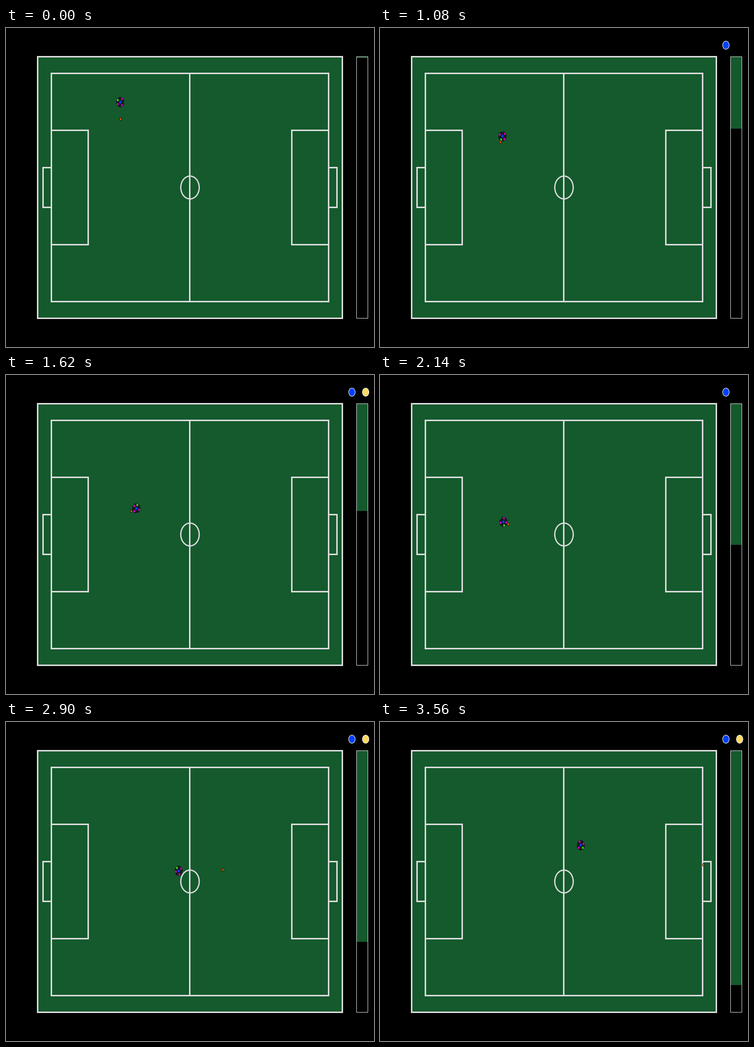
A matplotlib script that plays this animation: 750x650 px, repeating every 3.61 s.

```python
import numpy as np
import matplotlib.pyplot as plt
from matplotlib.animation import FuncAnimation
from matplotlib.patches import Ellipse, Polygon, Rectangle

W, H, DPI = 750, 650, 100
PX = 72 / DPI                       # one pixel in points
SCALE = np.array([94.2, -116.25])   # pixels per metre
TICK, STEP, LOOP = 10, 20, 3610
LAST_STEP = 178

GRASS, LINE = "#145a2d", "#dcdcdc"
BLUE, YELLOW = "#0040ff", "#fada5e"
GREEN, PURPLE, ORANGE = "#39dc14", "#cc00cc", "#fd6a02"
BODY = "#191919"

# Robot key poses: time, x, y
ROBOT = np.array([(0, 233, 151), (540, 232, 174), (1080, 249.5, 220.5),
                  (1620, 265.5, 272), (2150, 252, 299.5), (2600, 308, 304),
                  (3200, 389.5, 291.5), (3560, 409, 251)])
# time and angle in degrees: where the robot faces, where it touches the ball
HEADING = np.array([(0, 0), (540, -137.5), (1080, -263), (1620, -437),
                    (2600, -712.5), (3200, -768), (3560, -912)])
BEARING = np.array([(520, -84), (1080, -114), (1620, -155),
                    (2050, -25), (2580, -8)])
TOUCH, KICK, FINISH = 520, 2580, 2720
BALL_REST = 233.5, 185.5


def robot_at(t):
    """Cubic Hermite curve through the key poses."""
    times, pts = ROBOT[:, 0], ROBOT[:, 1:]
    slopes = np.gradient(pts, times, axis=0)
    i = min(np.searchsorted(times, t, "right") - 1, len(times) - 2)
    h = times[i + 1] - times[i]
    u = (t - times[i]) / h
    return ((1 + 2 * u) * (1 - u) ** 2 * pts[i]
            + u * (1 - u) ** 2 * h * slopes[i]
            + u * u * (3 - 2 * u) * pts[i + 1]
            + u * u * (u - 1) * h * slopes[i + 1])


def angle_at(keys, t):
    return np.radians(np.interp(t, keys[:, 0], keys[:, 1]))


def around(center, radius, angles):
    """Pixel points at polar offsets in metres from a center."""
    offsets = np.column_stack([np.cos(angles), np.sin(angles)])
    return center + radius * offsets * SCALE


def ball_at(t):
    """At rest, then pushed along by the robot, then shot at the goal."""
    if t < TOUCH:
        return BALL_REST
    if t < KICK:
        return around(robot_at(t), 0.115, [angle_at(BEARING, t)])[0]
    s = t - KICK
    return (317.3 + 0.4103 * s - 6.28e-5 * s * s,
            306.3 - 0.0165 * s + 1e-6 * s * s)


fig = plt.figure(figsize=(W / DPI, H / DPI), dpi=DPI, facecolor="black")
ax = fig.add_axes([0, 0, 1, 1])
ax.set_xlim(0, W)
ax.set_ylim(H, 0)
ax.axis("off")


def box(x0, y0, x1, y1, fill="none", edge=LINE, width=3):
    return ax.add_patch(Rectangle((x0, y0), x1 - x0, y1 - y0, fc=fill, ec=edge,
                                  lw=width * PX, joinstyle="miter", snap=False))


def dot(x, y, rx, ry, fill, edge="none", width=0, z=4):
    return ax.add_patch(Ellipse((x, y), 2 * rx, 2 * ry, fc=fill, ec=edge,
                                lw=width * PX, zorder=z))


# field
box(64.5, 58.5, 685.5, 591.5, fill=GRASS)
box(92.5, 92.5, 657.5, 557.5)
ax.plot([374.5, 374.5], [92.5, 557.5], color=LINE, lw=3 * PX, snap=False,
        solid_capstyle="butt", zorder=1)
for left, right, half in [(92.5, 167.5, 116.5), (75.5, 92.5, 40.5)]:
    box(left, 325 - half, right, 325 + half)
    box(W - right, 325 - half, W - left, 325 + half)
dot(375, 325, 18.8, 23.25, "none", LINE, 2.6, z=1)

# time bar and lamps
BAR_TOP, BAR_BOTTOM = 58.5, 591.5
bar = box(715, BAR_TOP, 737, BAR_TOP, fill=GRASS, edge="none", width=0)
box(714.5, BAR_TOP, 737.5, BAR_BOTTOM, width=1)
blue_lamp = dot(705, 35, 6.6, 8.3, BLUE, "white", 1)
yellow_lamp = dot(733, 35, 6.6, 8.3, YELLOW, "white", 1)

# robot: a disc with a flat front, and its tags
half_front = np.arccos(0.078 / 0.09)
RIM = np.linspace(half_front, 2 * np.pi - half_front, 40)
TAG_ANGLES = np.radians([57.4, -57.4, -147.4, 147.4])
body = ax.add_patch(Polygon(around((0, 0), 0.09, RIM), fc=BODY, zorder=3))
center_tag = dot(0, 0, 2.3, 2.9, BLUE)
tags = [dot(0, 0, 1.9, 2.4, color) for color in [PURPLE] * 3 + [GREEN]]
ball = dot(0, 0, 1.9, 2.6, ORANGE, "black", 0.8, z=5)


def draw(i):
    step = min(i * TICK // STEP, LAST_STEP)
    t = step * STEP
    pos, heading = robot_at(t), angle_at(HEADING, t)

    body.set_xy(around(pos, 0.09, RIM + heading))
    center_tag.center = pos
    for tag, place in zip(tags, around(pos, 0.065, TAG_ANGLES + heading)):
        tag.center = place
    ball.center = ball_at(t)

    filled = (BAR_BOTTOM - BAR_TOP) * (step + 1) / 200
    bar.set_height(round(BAR_TOP + filled) - BAR_TOP)
    blinking = t >= 320 and (t + 300) % 540 >= 80
    blue_lamp.set_visible(blinking or t >= FINISH)
    yellow_lamp.set_visible(1560 <= t < 1960 or t >= FINISH)
    return body, center_tag, *tags, ball, bar, blue_lamp, yellow_lamp


anim = FuncAnimation(fig, draw, frames=LOOP // TICK, interval=TICK,
                     repeat=True, repeat_delay=0)
plt.show()
```
